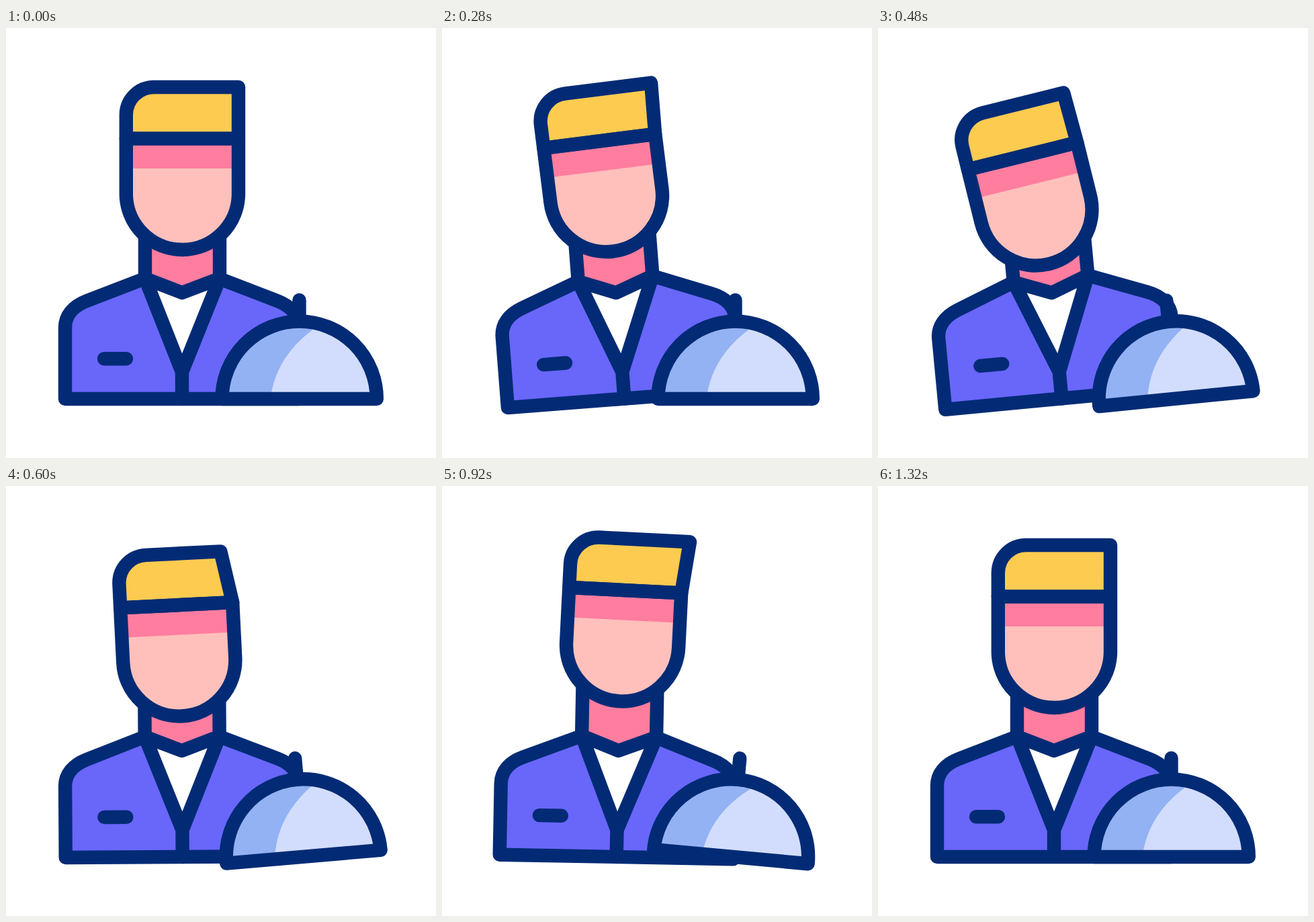
Recreate the animation shown at these times as an HTML page. Size 640 by 640 pixels, loop 1480 ms.

```html
<!DOCTYPE html>
<html lang="en">
<head>
<meta charset="utf-8">
<title>Waiter</title>
<style>
  html, body { margin: 0; width: 100%; height: 100%; overflow: hidden; background: #fff; }
  svg { display: block; width: 100vw; height: 100vh; }
  .line { fill: none; stroke: #032b75; stroke-width: 20.4; stroke-linecap: round; stroke-linejoin: round; }
</style>
</head>
<body>
<svg viewBox="0 0 640 640">
  <g id="body">
    <path class="line" style="fill:#6966fa" d="M88 552V446C88 428 100 414 120 406.3L207 372.8 262 394 317 372.8 404 406.3C424 414 436 428 436 446V552Z"/>
    <path fill="#fff" d="M207 372.8 262 394 317 372.8 262 512Z"/>
    <path fill="#ff7d9f" d="M207 275H318V372.8L262 394 207 372.8Z"/>
    <path class="line" d="M207 285V372.8L262 394 318 372.8V285M207 372.8 262 512V552M318 372.8 262 512M146 492.3H179"/>
    <g id="head">
      <path fill="#ffc0bb" d="M178.8 164.6V246.4A83.6 83.6 0 0 0 346 246.4V164.6Z"/>
      <path fill="#ff7d9f" d="M178.8 164.6H346V209H178.8Z"/>
      <path id="hair" class="line" style="fill:#fdcb50"/>
      <path class="line" d="M178.8 164.6V246.4A83.6 83.6 0 0 0 346 246.4V164.6Z"/>
    </g>
  </g>
  <g id="dish">
    <path class="line" d="M436.5 405V436"/>
    <path fill="#d2ddfd" d="M321.5 552A115 115.3 0 0 1 551.8 552Z"/>
    <path fill="#93b2f3" d="M321.5 552A115 115.3 0 0 1 468 441Q402 484 393.5 552Z"/>
    <path class="line" d="M321.5 552A115 115.3 0 0 1 551.8 552Z"/>
  </g>
</svg>
<script>
  const LOOP = 1480, TICK = 40;
  const $ = id => document.getElementById(id);
  const body = $('body'), head = $('head'), hair = $('hair'), dish = $('dish');

  // Smooth step from 0 to 1 between two times.
  function ease(t, from, to) {
    const p = Math.min(1, Math.max(0, (t - from) / (to - from)));
    return p * p * (3 - 2 * p);
  }

  // Goes from 0 to a at peak, over to b at turn, and back to 0 at end.
  function swing(t, a, b, start, peak, turn, end, hold = 0) {
    return a * ease(t, start, peak)
      + (b - a) * ease(t, peak + hold, turn)
      - b * ease(t, turn + hold, end);
  }

  function draw(ms) {
    const t = Math.floor((ms % LOOP) / TICK) * TICK;
    const lean = swing(t, -6.6, 3.2, 72, 410, 730, 1040);
    const nod = swing(t, -9, 4, 185, 445, 755, 1065);
    const sink = swing(t, 21, -13.5, 225, 497, 815, 1115);
    const tilt = swing(t, -5.8, 5.7, 280, 500, 805, 1200, 58);
    const windUp = 6 * (ease(t, 160, 380) - ease(t, 380, 620));
    const tip = windUp + swing(t, -14.5, 9, 380, 620, 900, 1330);

    body.setAttribute('transform', `rotate(${lean} 262 430)`);
    head.setAttribute('transform', `translate(0 ${sink}) rotate(${nod} 262.4 330)`);
    dish.setAttribute('transform', `rotate(${tilt} 436.5 479)`);
    hair.setAttribute('d', `M178.8 164.6V129.5A41.5 41.5 0 0 1 220.3 88H${346 + tip}L346 164.6Z`);
  }

  let start;
  function loop(now) {
    if (start === undefined) start = now;
    draw(now - start);
    requestAnimationFrame(loop);
  }
  draw(0);
  requestAnimationFrame(loop);
</script>
</body>
</html>
```
